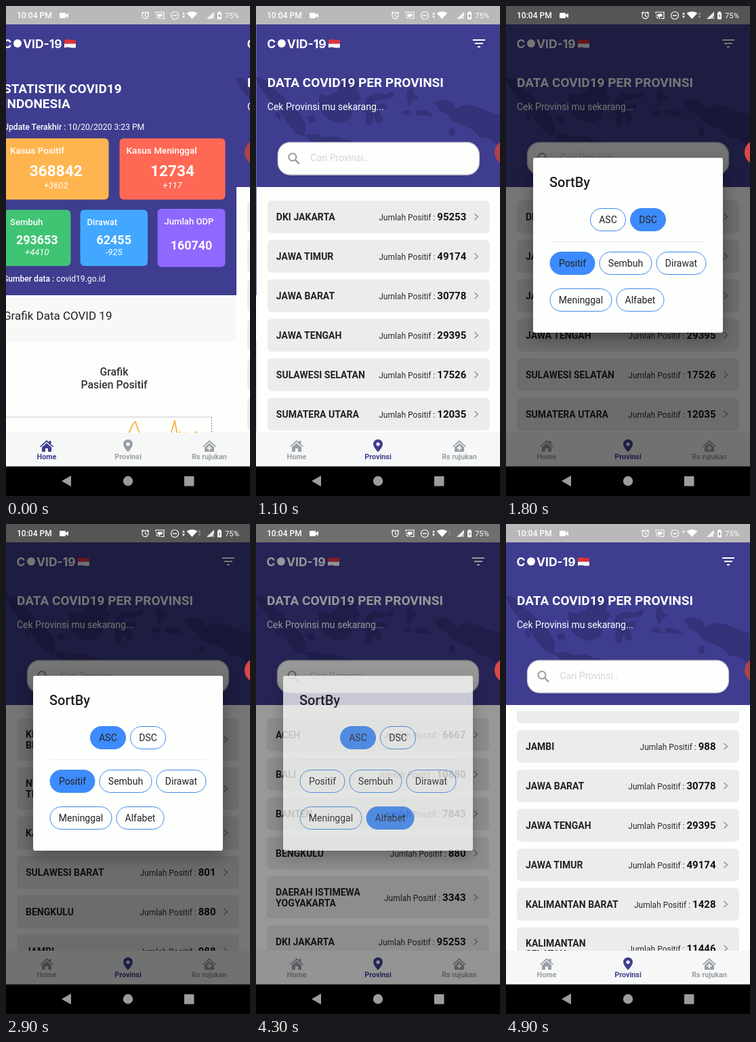
Animation, 360 px wide and 720 px high, one loop 5000 ms. Source, as an HTML page:

```html
<!DOCTYPE html>
<html lang="id">
<head>
<meta charset="utf-8">
<title>Statistik</title>
<style>
html, body { margin: 0; width: 100%; height: 100%; overflow: hidden; background: #000; }
svg { display: block; width: 360px; height: 720px; font-family: Roboto, "Noto Sans", sans-serif; }
#dialog .box { filter: drop-shadow(0 9px 11px rgba(0, 0, 0, .35)); }
</style>
</head>
<body>
<svg id="stage" viewBox="0 0 360 720" xmlns="http://www.w3.org/2000/svg">
  <clipPath id="listClip"><rect x="0" y="275" width="360" height="352"/></clipPath>
  <g id="home"></g>
  <g id="province"></g>
  <g id="tabs"></g>
  <rect id="statusBg" width="360" height="27" fill="#b9b9b9"/>
  <rect id="dim" width="360" height="677" fill="#000"/>
  <g id="dialog"></g>
  <circle id="bubble" cx="370" cy="215" r="18"/>
  <g id="status"></g>
  <g id="system"></g>
</svg>
<script>
const LOOP = 5000, STEP = 100;
const PURPLE = '#3f3d8f', PAPER = '#fdfffd', INK = '#212121', GREY = '#9b9ea6';
const el = id => document.getElementById(id);
const clamp = v => Math.max(0, Math.min(1, v));

const text = (x, y, size, str, fill = INK, weight = 400, extra = '') =>
  `<text x="${x}" y="${y}" font-size="${size}" fill="${fill}" font-weight="${weight}" ${extra}>${str}</text>`;
const middle = (x, y, size, str, fill, weight, extra = '') =>
  text(x, y, size, str, fill, weight, `text-anchor="middle" ${extra}`);
const rect = (x, y, w, h, fill, r = 0, extra = '') =>
  `<rect x="${x}" y="${y}" width="${w}" height="${h}" rx="${r}" fill="${fill}" ${extra}/>`;
const path = (d, fill, extra = '') => `<path d="${d}" fill="${fill}" ${extra}/>`;
const line = (d, stroke, width = 1, extra = '') =>
  path(d, 'none', `stroke="${stroke}" stroke-width="${width}" ${extra}`);

const brandFont = 'font-family="Inter, sans-serif"';
const brand = text(15.5, 61.5, 17.5, 'C', '#fff', 700, brandFont) +
  '<circle cx="37" cy="55" r="6" fill="#fff"/>' +
  text(45, 61.5, 17.5, 'VID-19', '#fff', 700, brandFont) +
  path('M106 50Q110 48.500 114.500 49.500T123 49.500V55.500H106Z', '#e0313a') +
  path('M106 55.500H123V61Q119 62 114.500 61T106 61.500Z', '#f6f6f6');

// Home page
function statCard(x, y, w, h, fill, label, labelY, labelSize, num, numY, numSize, diff, diffY) {
  const cx = x + w / 2;
  return rect(x, y, w, h, fill, 6) +
    text(x + 10, labelY, labelSize, label, '#fff', 500) +
    middle(cx, numY, numSize, num, '#fff', 700) +
    (diff ? middle(cx, diffY, 13, diff, '#fff', 400, 'font-style="italic"') : '');
}
const twoPart = (y, size, a, b) =>
  text(16, y, size, `<tspan font-weight="500">${a}</tspan> ${b}`, '#fff');

el('home').innerHTML =
  rect(0, 27, 360, 650, PAPER) + rect(0, 27, 360, 398, PURPLE) + brand +
  text(16, 128, 19, 'STATISTIK COVID19', '#fff', 700) +
  text(16, 150, 19, 'INDONESIA', '#fff', 700) +
  twoPart(181.5, 12.2, 'Update Terakhir :', '10/20/2020 3:23 PM') +
  statCard(16, 194.5, 155.5, 90, '#ffb54f', 'Kasus Positif', 217, 13.5, '368842', 249.5, 22.7, '+3602', 268) +
  statCard(187.5, 194.5, 156, 90, '#ff6854', 'Kasus Meninggal', 217, 13.5, '12734', 249.5, 22.7, '+117', 268) +
  statCard(16, 299.5, 99.5, 82.5, '#3fc473', 'Sembuh', 321.5, 13.1, '293653', 349.5, 17.9, '+4410', 366) +
  statCard(129.5, 299.5, 99.5, 82.5, '#42a8ff', 'Dirawat', 321.5, 13.1, '62455', 349.5, 17.9, '-925', 366) +
  statCard(243.5, 298, 100, 85.5, '#8f68ff', 'Jumlah ODP', 320.5, 13.1, '160740', 357.5, 17.9) +
  twoPart(404.5, 12.1, 'Sumber data :', 'covid19.go.id') +
  rect(0, 425, 360, 68, '#f7f9f7') +
  text(16, 460.500, 17, 'Grafik Data COVID 19') +
  middle(179.5, 542.5, 15.8, 'Grafik', '#333', 500) +
  middle(179.5, 561.5, 15.8, 'Pasien Positif', '#333', 500) +
  line('M0 604H323', '#c4c6c4') +
  line('M323.500 604V640', '#888', 1, 'stroke-dasharray="2 2"') +
  line('M200 630L208 613.500L211 611L218 632M262 632L269 609.500L273 632L277 626L281 632L286 627L290 632L301 626L304 632',
    '#ffb54f', 2, 'stroke-linejoin="round"') +
  text(320, 635.5, 11.5, '3602', '#555');

// Province page
const islands = [
  'M0 106L12 109L24 122L38 133L52 148L64 160L72 176L70 190L60 187L46 171L34 154L20 138L8 122Z',
  'M73 190L88 189L100 194L116 192L128 197L144 200L141 206L120 204L98 201L80 198Z',
  'M93 130L104 133L118 127L128 112L140 104L150 113L146 124L153 134L144 146L138 164L126 171L112 168L100 160L93 146Z',
  'M164 135L174 129L190 131L202 126L200 134L184 137L172 138L174 147L188 144L192 149L180 153L186 168L179 171L173 158L169 174L162 174L163 158L158 152Z',
  'M150 202L158 201L163 206L152 207ZM168 204L184 203L196 207L182 210ZM186 213L196 212L200 217L190 218ZM205 212L222 203L226 206L210 217Z',
  'M222 126L229 121L231 130L238 134L230 138L226 147L223 137ZM216 155L226 154L228 159L218 159ZM236 154L252 155L259 161L248 160L236 159Z',
  'M264 142L276 138L288 142L294 153L306 146L322 148L342 156L360 162V206L344 194L330 192L318 180L302 174L290 168L282 158L272 154Z',
  'M30 156L36 163L33 166L28 159ZM75 163L84 161L87 169L79 171ZM286 181L291 179L292 188L286 190Z'
].join('');

el('province').innerHTML =
  rect(0, 27, 360, 650, PAPER) + rect(0, 27, 360, 239, PURPLE) +
  path(islands, '#343279', 'stroke="#343279" stroke-width="2" stroke-linejoin="round"') + brand +
  line('M319 50H337M322 55H334M326 60H330', '#fff', 2) +
  text(16, 118.5, 19, 'DATA COVID19 PER PROVINSI', '#fff', 700) +
  text(16, 153, 14, 'Cek Provinsi mu sekarang...', '#fff') +
  rect(31.5, 200.5, 297, 47.5, PAPER, 18, 'stroke="#c9c9d2" stroke-width="1.3"') +
  '<circle cx="53" cy="222" r="5.500" fill="none" stroke="#999" stroke-width="2"/>' +
  line('M57 226L63 232', '#999', 2.4) +
  text(79.5, 228, 14, 'Cari Provinsi..', '#d3d5d4') +
  '<g clip-path="url(#listClip)"><g id="list"></g></g>';

const byCount = [['DKI JAKARTA', 95253], ['JAWA TIMUR', 49174], ['JAWA BARAT', 30778],
  ['JAWA TENGAH', 29395], ['SULAWESI SELATAN', 17526], ['SUMATERA UTARA', 12035]];
const ascending = [['KEPULAUAN BANGKA|BELITUNG', 536], ['NUSA TENGGARA|TIMUR', 579],
  ['KALIMANTAN UTARA', 719], ['SULAWESI BARAT', 801], ['BENGKULU', 880], ['JAMBI', 988]];
const byName = [['ACEH', 6667], ['BALI', 10880], ['BANTEN', 7843], ['BENGKULU', 880],
  ['DAERAH ISTIMEWA|YOGYAKARTA', 3343], ['DKI JAKARTA', 95253], ['GORONTALO', 2900],
  ['JAMBI', 988], ['JAWA BARAT', 30778], ['JAWA TENGAH', 29395], ['JAWA TIMUR', 49174],
  ['KALIMANTAN BARAT', 1428], ['KALIMANTAN|SELATAN', 11446]];

function listMarkup(rows) {
  let y = 285.7;
  return rows.map(([name, count]) => {
    const words = name.split('|'), h = words.length > 1 ? 62 : 48, cy = y + h / 2;
    const title = words.map((w, i) =>
      text(29, cy + 5.2 + (i - (words.length - 1) / 2) * 16.4, 14, w, INK, 700)).join('');
    const row = rect(16, y, 328, h, '#ebeceb', 6) + title +
      text(309.5, cy + 5.2, 12,
        `Jumlah Positif : <tspan font-size="15" font-weight="700" fill="#111">${count}</tspan>`,
        '#2b2b2b', 400, 'text-anchor="end"') +
      line(`M321.500 ${cy - 4.5}l5 4.500l-5 4.500`, '#929292', 1.5);
    y += h + 10;
    return row;
  }).join('');
}

// Bottom tabs
const house = x => `M${x - 10} 647L${x} 638L${x + 3.5} 641V639H${x + 6.500}V644L${x + 10} 647L${x + 9} 648.300L${x} 640.500L${x - 9} 648.300Z` +
  `M${x - 7} 648.200L${x} 642.200L${x + 7} 648.200V655H${x + 2}V650H${x - 2}V655H${x - 7}Z`;
const pin = 'M180 655.500Q173 648 173 643.800A7 7 0 0 1 187 643.800Q187 648 180 655.500ZM180 641.200A2.600 2.600 0 1 0 180 646.400A2.600 2.600 0 1 0 180 641.200Z';
const clinic = 'M290 647L300 638L310 647L309 648.300L300 640.500L291 648.300ZM293 648.200L300 642.200L307 648.200V655H293ZM299 646V648.500H296.500V650.500H299V653H301V650.500H303.500V648.500H301V646Z';

el('tabs').innerHTML = rect(0, 627, 360, 50, '#f6f8f7') +
  [[60, 'Home', house(60)], [180, 'Provinsi', pin], [300, 'Rs rujukan', clinic]]
    .map(([x, label, icon]) => `<g class="tab">${path(icon, 'currentColor', 'fill-rule="evenodd"')}` +
      middle(x, 665.5, 10.8, label, 'currentColor', 700) + '</g>').join('');
const tabs = document.querySelectorAll('.tab');

// Sort dialog
const chips = [['ASC', 124, 297, 53], ['DSC', 183, 297, 53], ['Positif', 64.5, 361, 67],
  ['Sembuh', 137.5, 361, 78], ['Dirawat', 221.5, 361, 74], ['Meninggal', 64.5, 415, 92],
  ['Alfabet', 162.5, 415, 71]];
el('dialog').innerHTML = rect(40, 223, 280, 257, PAPER, 3, 'class="box"') +
  text(64, 266, 20, 'SortBy', INK, 500) +
  line('M64 346.500H296', '#ebedeb') +
  chips.map(([label, x, y, w]) =>
    rect(x + .5, y + .5, w - 1, 33, PAPER, 16.5, 'class="chip" stroke="#3d87ee"') +
    middle(x + w / 2, y + 22, 14, label, '#222', 400)).join('');
const chipBoxes = document.querySelectorAll('.chip');

// Status and system bars
el('status').innerHTML = text(16, 18, 12, '10:04 PM', '#fff', 500) +
  rect(79, 10, 9, 8, '#fff', 1) + path('M88 13L92 10.500V17.500L88 15Z', '#fff') +
  '<circle cx="205.500" cy="14" r="4.600" fill="none" stroke="#fff" stroke-width="1.200"/>' +
  line('M205.500 11V14.500L208 16M199.800 11L202.800 8.500M211.200 11L208.200 8.500', '#fff', 1.2) +
  line('M221 11V9H233V18.500H228.500M221 13A6 6 0 0 1 227 19M221 16A3 3 0 0 1 224 19', '#fff', 1.2) +
  rect(224, 11.5, 6.5, 4, '#fff') +
  '<circle cx="249" cy="14" r="5.500" fill="none" stroke="#fff" stroke-width="1.200"/>' +
  line('M246 14H252', '#fff', 1.4) +
  path('M260 12.500L262 9L264 12.500Z', '#fff') +
  path('M260 14.500L262 18L264 14.500Z', '#fff', 'id="down"') +
  path('M266.500 10.500Q274.500 5.500 282.500 10.500L274.500 19Z', '#fff') +
  path('M283.500 12.500L285.500 9L287.500 12.500ZM283.500 14.500L285.500 18L287.500 14.500Z', '#999', 'id="data"') +
  path('M296 19L307 8.500V14L302 19Z', '#fff', 'opacity=".85"') +
  line('M303.500 15.500L307 19M307 15.500L303.500 19', '#fff', 1) +
  path('M312 9.500H313.700V8H316.300V9.500H318V19.500H312Z', '#fff') +
  path('M315.500 11L313.300 15H314.800V18L316.800 14H315.500Z', '#888') +
  text(323, 18, 11.3, '75%', '#fff');

el('system').innerHTML = rect(0, 676.5, 360, 43.5, '#000') +
  path('M82 698L96 690V706Z', '#9c9c9c') +
  '<circle cx="180" cy="698" r="7.200" fill="#9c9c9c"/>' +
  rect(263, 691, 14.5, 14.5, '#9c9c9c', 1);

let shownRows = null;
function setRows(rows) {
  if (rows === shownRows) return;
  shownRows = rows;
  el('list').innerHTML = listMarkup(rows);
}

const EMPTY = [];
function rowsAt(t) {
  if (t < 2300) return byCount;
  if (t < 2600) return EMPTY;
  if (t < 3700) return ascending;
  return t < 4000 ? EMPTY : byName;
}

function draw(t) {
  const slide = t < 1300 ? 340 * Math.exp(-t / 183) : 0;
  el('home').setAttribute('transform', `translate(${slide - 360})`);
  el('province').setAttribute('transform', `translate(${slide})`);
  tabs.forEach((tab, i) => { tab.style.color = i === (slide < 180 ? 1 : 0) ? PURPLE : GREY; });

  setRows(rowsAt(t));
  const scroll = 403 * Math.pow(Math.max(0, (t - 4500) / 400), 1.3);
  el('list').setAttribute('transform', `translate(0 ${-scroll})`);

  const open = clamp((t - 1400) / 200) * clamp((4450 - t) / 200);
  el('dim').setAttribute('opacity', .54 * open);
  el('dialog').setAttribute('opacity', open);
  el('bubble').setAttribute('fill', open > .5 ? '#d94a45' : '#ab4349');
  el('data').setAttribute('opacity', open);
  el('down').setAttribute('opacity', t < 4450 ? 1 : 0);

  const picked = [t < 2300 ? 'DSC' : 'ASC', t < 3700 ? 'Positif' : 'Alfabet'];
  chipBoxes.forEach((box, i) =>
    box.setAttribute('fill', picked.includes(chips[i][0]) ? '#3d8bff' : PAPER));
}

const start = performance.now();
function tick() {
  const t = (performance.now() - start) % LOOP;
  draw(Math.floor(t / STEP) * STEP);
  requestAnimationFrame(tick);
}
tick();
</script>
</body>
</html>
```
